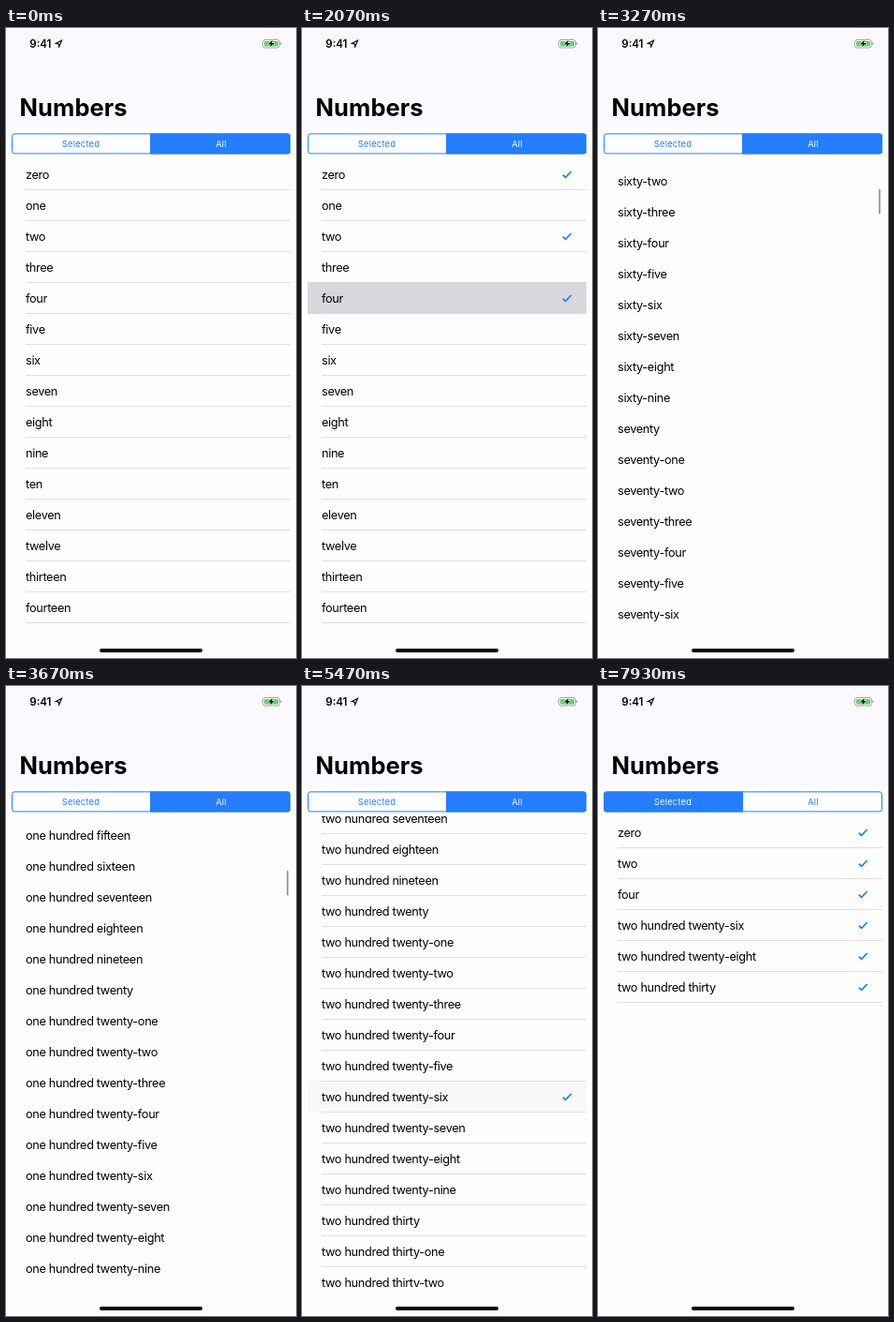
Recreate the animation shown at these times as an HTML page with a canvas. Size 310 px wide and 672 px high, loop 8000 ms.

```html
<!DOCTYPE html>
<html lang="en">
<head>
<meta charset="utf-8">
<title>Numbers</title>
<style>
html, body { margin: 0; width: 100%; height: 100%; overflow: hidden; background: #fefefe; }
canvas { display: block; }
</style>
</head>
<body>
<canvas id="stage" width="310" height="672"></canvas>
<script>
const ctx = document.getElementById('stage').getContext('2d');
const LOOP = 8000, STEP = 1000 / 15, ROW = 33, TOP = 140, BOTTOM = 641, COUNT = 1000;
const BLUE = '#247eff', FAMILY = 'Inter, "Liberation Sans", sans-serif';
const SWITCH = 7130;

// [time, row]
const taps = [[800, 0], [1270, 2], [1930, 4], [5130, 226], [5730, 228], [6330, 230]];
// [step, offset, speed in px per step]
const scrollKeys = [[36, 0, 33], [43, 1083, 67], [55, 3792, 333], [63, 6645, 233], [68, 7176, 0]];

const ones = ('zero one two three four five six seven eight nine ten eleven twelve thirteen ' +
  'fourteen fifteen sixteen seventeen eighteen nineteen').split(' ');
const tens = '- - twenty thirty forty fifty sixty seventy eighty ninety'.split(' ');

const clamp = x => Math.min(1, Math.max(0, x));
const smooth = x => { x = clamp(x); return x * x * (3 - 2 * x); };

function spell(n) {
  if (n < 20) return ones[n];
  if (n < 100) return tens[n / 10 | 0] + (n % 10 ? '-' + ones[n % 10] : '');
  return ones[n / 100 | 0] + ' hundred' + (n % 100 ? ' ' + spell(n % 100) : '');
}

// Cubic Hermite curve through the scroll keys
function scrollAt(step) {
  const last = scrollKeys.length - 1;
  if (step <= scrollKeys[0][0]) return 0;
  if (step >= scrollKeys[last][0]) return scrollKeys[last][1];
  const i = scrollKeys.findIndex(k => k[0] > step);
  const [t0, p0, v0] = scrollKeys[i - 1], [t1, p1, v1] = scrollKeys[i];
  const d = t1 - t0, u = (step - t0) / d, w = 1 - u;
  return p0 * w * w * (1 + 2 * u) + p1 * u * u * (1 + 2 * w) + d * u * w * (v0 * w - v1 * u);
}

function text(str, x, y, size, weight = 400, color = '#000', spacing = 0, align = 'left') {
  ctx.font = `${weight} ${size}px ${FAMILY}`;
  ctx.letterSpacing = spacing + 'px';
  ctx.textAlign = align;
  ctx.fillStyle = color;
  ctx.fillText(str, x, y);
}

function pill(x, y, w, h, r, color) {
  ctx.beginPath();
  ctx.roundRect(x, y, w, h, r);
  ctx.fillStyle = color;
  ctx.fill();
}

function path(points, close) {
  ctx.beginPath();
  points.forEach(([x, y]) => ctx.lineTo(x, y));
  if (close) ctx.closePath();
}

function drawHeader() {
  ctx.fillStyle = '#fbf9fd';
  ctx.fillRect(0, 0, 310, 107);
  text('9:41', 25.3, 21, 11.5, 600);

  path([[59.6, 13.2], [53.2, 16.5], [56.2, 17], [56.7, 20]], true);
  ctx.strokeStyle = '#000';
  ctx.lineWidth = 1.1;
  ctx.stroke();

  ctx.beginPath();
  ctx.roundRect(274.5, 12.5, 18, 8.5, 2.5);
  ctx.strokeStyle = '#a5a4a8';
  ctx.lineWidth = 1;
  ctx.stroke();
  pill(276, 14, 15, 5.5, 1, '#5ed566');
  pill(293.3, 15.2, 1.2, 3, .6, '#a5a4a8');
  path([[284.8, 12.8], [280.3, 17.4], [283, 17.4], [282.2, 20.6], [286.7, 16], [284, 16]], true);
  ctx.strokeStyle = '#fff';
  ctx.stroke();
  ctx.fillStyle = '#000';
  ctx.fill();

  text('Numbers', 14.5, 94, 25.5, 700, '#000', .1);
}

function drawSegments(active) {
  ctx.save();
  ctx.beginPath();
  ctx.roundRect(6, 112.4, 298, 22, 3);
  ctx.clip();
  ctx.fillStyle = '#fff';
  ctx.fillRect(6, 112, 298, 23);
  ctx.fillStyle = BLUE;
  ctx.fillRect(active ? 154 : 6, 112, active ? 150 : 149, 23);
  ctx.restore();
  ctx.beginPath();
  ctx.roundRect(6.5, 112.9, 297, 21, 2.5);
  ctx.strokeStyle = BLUE;
  ctx.lineWidth = 1;
  ctx.stroke();
  ['Selected', 'All'].forEach((label, i) =>
    text(label, 80 + i * 150, 127, 9.3, 400, i === active ? '#fff' : BLUE, .24, 'center'));
}

function drawRow(n, y, glow, checked, lineAlpha) {
  if (glow) {
    ctx.fillStyle = `rgba(217,215,220,${glow})`;
    ctx.fillRect(6, y - 1, 298, ROW + 1);
  }
  ctx.fillStyle = `rgba(223,223,226,${lineAlpha})`;
  ctx.fillRect(21, y + ROW - 1, 283, 1);
  text(spell(n), 21, y + 21, 12.75, 400, '#000', -.35);
  if (checked) {
    path([[278.8, y + 16.7], [281.7, y + 19.4], [287.8, y + 13]]);
    ctx.strokeStyle = '#147efb';
    ctx.lineWidth = 1.6;
    ctx.stroke();
  }
}

function drawList(t, step) {
  if (t >= SWITCH) {
    taps.forEach(([, n], i) => drawRow(n, TOP + i * ROW, 0, true, 1));
    return;
  }
  const offset = Math.round(scrollAt(step));
  // Hairlines blur away while the list moves fast
  const speed = scrollAt(step + .5) - scrollAt(step - .5);
  const lineAlpha = 1 - clamp((speed - 100) / 100);
  const first = Math.floor(offset / ROW);
  for (let n = first; n < first + 17; n++) {
    const tap = taps.find(k => k[1] === n);
    const age = tap ? t - tap[0] : -1;
    const glow = age < 0 ? 0 : 1 - smooth((age - 150) / 250);
    drawRow(n, TOP + n * ROW - offset, glow, age >= 65, lineAlpha);
  }
  const barAlpha = step < 36 ? 0 : 1 - clamp((step - 68) / 4);
  if (barAlpha) {
    const barY = 142 + offset / (COUNT * ROW - 500) * 469;
    pill(300, barY, 2, 27, 1, `rgba(0,0,0,${.36 * barAlpha})`);
  }
}

function draw(now) {
  const step = Math.floor((now % LOOP) / STEP + .01);
  const t = Math.ceil(step * STEP / 10 - .01) * 10;
  ctx.fillStyle = '#fefefe';
  ctx.fillRect(0, 0, 310, 672);
  ctx.save();
  ctx.beginPath();
  ctx.rect(0, TOP - 1, 310, BOTTOM - TOP + 1);
  ctx.clip();
  drawList(t, step);
  ctx.restore();
  drawHeader();
  drawSegments(t < SWITCH ? 1 : 0);
  pill(100, 662, 110, 4, 2, '#000');
}

const start = performance.now();
function tick() {
  draw(performance.now() - start);
  requestAnimationFrame(tick);
}
tick();
</script>
</body>
</html>
```
